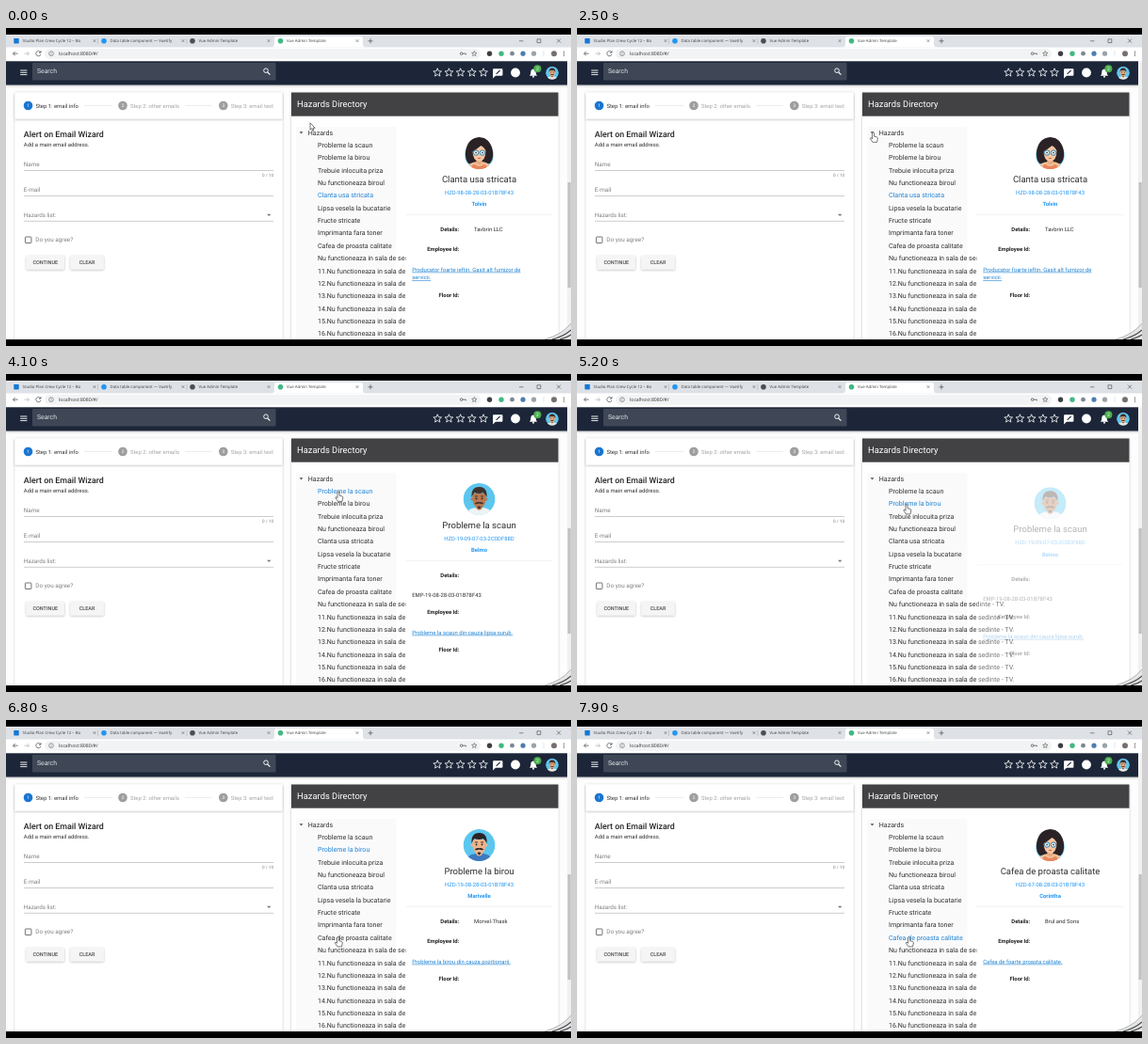
An HTML page that plays this animation: 600x338 px, repeating every 8 s.

```html
<!DOCTYPE html>
<html lang="en">
<head>
<meta charset="utf-8">
<title>Hazards Directory</title>
<style>
  html, body { margin: 0; width: 100%; height: 100%; overflow: hidden; background: #000; }
  #stage { display: block; width: 600px; height: 338px; }
  text { font-family: Roboto, sans-serif; text-rendering: geometricPrecision; white-space: pre; }
  .chrome text { font-family: "Open Sans", sans-serif; }
</style>
</head>
<body>
<svg id="stage" viewBox="0 0 600 338" xmlns="http://www.w3.org/2000/svg"></svg>
<script>
const LOOP = 8000, ROW = 13.36, TREE_H = 16 * ROW, FADE = 300, SLIDE = 6.5;
const BLUE = '#1f82d2', INK = '#303030', GREY = '#808080', NAVY = '#1c2638';

// Markup helpers
const text = (x, y, s, size, fill = INK, more = '') =>
  `<text x="${x}" y="${y}" font-size="${size}" fill="${fill}" ${more}>${s}</text>`;
const rect = (x, y, w, h, fill, more = '') =>
  `<rect x="${x}" y="${y}" width="${w}" height="${h}" fill="${fill}" ${more}/>`;
const dot = (x, y, r, fill, more = '') =>
  `<circle cx="${x}" cy="${y}" r="${r}" fill="${fill}" ${more}/>`;
const line = (d, stroke, w = .7, more = '') =>
  `<path d="${d}" fill="none" stroke="${stroke}" stroke-width="${w}" ${more}/>`;
const shape = (d, fill, more = '') => `<path d="${d}" fill="${fill}" ${more}/>`;
const group = (x, y, scale, body) => `<g transform="translate(${x} ${y}) scale(${scale})">${body}</g>`;
const MID = 'text-anchor="middle"', END = 'text-anchor="end"', BOLD = 'font-weight="700"', MEDIUM = 'font-weight="500"';

function star(x, y, r, color, w) {
  let d = '';
  for (let i = 0; i < 10; i++) {
    const a = Math.PI * (i / 5 - .5), q = i % 2 ? r * .44 : r;
    d += (i ? 'L' : 'M') + (x + q * Math.cos(a)).toFixed(2) + ' ' + (y + q * Math.sin(a)).toFixed(2);
  }
  return line(d + 'Z', color, w);
}

// Cartoon portraits, drawn in a circle of radius 17
const woman = () => `<g clip-path="url(#round)">
  ${dot(0, 2, 15.2, '#5cc0ea')}
  ${shape('M-11 11C-18 5-15-17 0-17S18 5 11 11Z', '#2a2226')}
  ${shape('M-13 18C-12 10-5 9 0 9S12 10 13 18Z', '#f0bd94')}
  ${shape('M-9 18Q-8 12-5 12Q0 16 5 12Q8 12 9 18Z', '#e8845c')}
  ${shape('M-3 5H3V10Q0 14-3 10Z', '#e5a87f')}
  ${shape('M-7-3Q-7 8 0 9Q7 8 7-3Q5-9 0-9T-7-3Z', '#f6c6a0')}
  ${shape('M-8-1Q-8-11 1-11Q9-11 8-1Q6-6 2-8Q-3-4-8-1Z', '#2a2226')}
  <g fill="#dff1f8" stroke="#3a7fa6" stroke-width="1"><circle cx="-3.4" cy="-.4" r="2.7"/><circle cx="3.4" cy="-.4" r="2.7"/></g>
  ${dot(-3.4, -.4, .8, '#222')}${dot(3.4, -.4, .8, '#222')}
  ${shape('M-2 5Q0 6.8 2 5Z', '#c8443f')}</g>`;

const man = (hair, skin, shirt) => `<g clip-path="url(#round)">
  ${dot(0, 0, 17, '#5cc6ee')}
  ${shape('M-14 18C-13 9-5 9 0 9S13 9 14 18Z', shirt)}
  ${shape('M-3 5H3V10Q0 13-3 10Z', skin)}
  ${dot(-7.4, 0, 1.6, skin)}${dot(7.4, 0, 1.6, skin)}
  ${shape('M-7-6Q-8 9 0 10Q8 9 7-6Z', skin)}
  ${shape('M-8-2Q-9-13 0-13T8-2Q6-6 4-7Q0-5-5-7Q-7-5-8-2Z', hair)}
  ${dot(-3, -.6, .9, '#222')}${dot(3, -.6, .9, '#222')}
  ${line('M-4.6-3H-1.6M1.6-3H4.6', hair, .9)}
  ${shape('M-5 5Q-3 2.4 0 3.2Q3 2.4 5 5Q2 5.4 0 4.6Q-2 5.4-5 5Z', hair)}
  ${shape('M-2 8Q0 7 2 8Q1 10.4 0 10.4T-2 8Z', hair)}</g>`;

// Browser window
function tab(x, w, label, icon, square) {
  const mark = square ? rect(x - 2.7, 11, 5.4, 5.4, icon, 'rx=".6"') : dot(x, 13.8, 2.8, icon);
  return mark + `<svg x="${x + 6}" y="8" width="${w - 10}" height="12">${text(.5, 7.2, label, 4.33, '#3c4043')}</svg>` +
    line(`M${x + w - 1.4} 12.2l2.8 2.8m0-2.8l-2.8 2.8`, '#5f6368', .6);
}

const browser = () => '<g class="chrome">' + rect(0, 7, 600, 14, '#dee1e6') +
  shape('M282 20.5Q285 20 285 17V11.5Q285 9 287.5 9H376.5Q379 9 379 11.5V17Q379 20 382 20.5Z', '#fff') +
  tab(11, 83, 'Studio Plan Crew Cycle 12 – Bo', '#1478d4', true) +
  tab(104, 84, 'Data table component — Vuetify', '#2196f3') +
  tab(198, 81, 'Vue Admin Template', '#4a4f55') +
  tab(291.5, 81.5, 'Vue Admin Template', '#41b883') +
  line('M97.5 11v6M192 11v6', '#9aa0a6', .4) +
  line('M384.5 13.8h5M387 11.3v5', '#4a4d51', .7) +
  line('M545 13.8h4.4M564 11.8h3.8v3.8h-3.8zM585 11.6l4 4m0-4l-4 4', '#222', .5) +
  rect(0, 20.5, 600, 14.8, '#fff') + rect(41, 22, 463, 10.8, '#f1f3f4', 'rx="5.4"') +
  '<g transform="translate(0 -.4)">' +
  line('M12.5 27.6h-5m2.2-2.2l-2.2 2.2 2.2 2.2', '#505358', .8) +
  line('M19.5 27.6h5m-2.2-2.2l2.2 2.2-2.2 2.2', '#b5b8bc', .8) +
  line('M36.6 26.2a2.6 2.6 0 1 0 .3 2.2M37 24.6v2h-2', '#505358', .8) +
  dot(48, 27.6, 2.4, 'none', 'stroke="#5f6368" stroke-width=".6"') + line('M48 27.2v1.6M48 26v.5', '#5f6368', .6) +
  text(56, 29.5, 'localhost:8080/#/', 5.15, '#333') +
  dot(483.6, 27.6, 1.3, 'none', 'stroke="#555" stroke-width=".8"') + line('M485 27.6h3.4v1.2', '#555', .8) +
  star(497.3, 27.7, 2.8, '#555', .6) +
  dot(513.5, 27.6, 2.7, '#3c3f44') + dot(526, 27.6, 2.7, '#41b883') + dot(537.5, 27.6, 2.4, '#7c8792') +
  dot(549, 27.6, 2.6, '#4e7db0') + dot(560.5, 27.6, 2.6, '#9aa3a9') +
  line('M571 24.5v6.2', '#c6c9cc', .5) + dot(582, 27.6, 3, '#77706e') +
  [25.6, 27.6, 29.6].map(y => dot(592.5, y, .6, '#555')).join('') + '</g></g>';

// Application bar
const appBar = () => rect(0, 35, 600, 25.5, NAVY, 'filter="url(#soft)"') +
  rect(28, 37, 258.5, 18.5, '#3f4757', 'rx="1"') +
  line('M15.2 45h7.2M15.2 47.3h7.2M15.2 49.6h7.2', '#fff', .9) +
  text(33, 48.4, 'Search', 6.8, '#dfe2e6') +
  dot(276, 45.2, 2.3, 'none', 'stroke="#fff" stroke-width=".9"') + line('M277.7 47l2.7 2.7', '#fff', 1.1) +
  [458.2, 470.4, 482.6, 494.8, 507].map(x => star(x, 47.4, 4.6, '#fff', .8)).join('') +
  shape('M518 43.2h8.4q1 0 1 1v5.6q0 1-1 1h-6.4l-3 2.6v-9.2q0-1 1-1z', '#fff') +
  line('M520.6 48.8l4-3.8', NAVY, 1.1) +
  dot(541, 47.5, 4.9, '#fff') +
  shape('M556 50.7q1.3-1 1.3-3.8 0-2.8 2.7-3.3 2.7.5 2.7 3.3 0 2.8 1.3 3.8z', '#fff') + dot(560, 51.7, 1, '#fff') +
  dot(564.4, 43.2, 4, '#4caf50') + text(564.4, 45, '2', 5, '#fff', MID) +
  group(580, 47.8, .41, man('#4a2d25', '#e3a77e', '#e9e4e0'));

// Form card
const step = (x, n, label, on) => dot(x, 82.5, 4.8, on ? '#1976d2' : '#9e9e9e') +
  text(x, 84.3, n, 4.8, '#fff', MID) + text(x + 7.9, 84.6, label, 5.9, on ? '#333' : '#a4a4a4');
const button = (x, w, label) => rect(x, 242, w, 14.4, '#f5f5f5', 'rx="1" filter="url(#soft)"') +
  text(x + w / 2, 251.1, label, 5.5, '#4a4a4a', MID + ' ' + MEDIUM);

const form = () => rect(9.5, 68.5, 284, 28, '#fff', 'filter="url(#soft)"') +
  step(23.5, 1, 'Step 1: email info', true) + step(124, 2, 'Step 2: other emails') + step(230.8, 3, 'Step 3: email text') +
  line('M83 82.5H113M190 82.5H219', '#dadada', .5) +
  text(18.8, 115.9, 'Alert on Email Wizard', 8.85, '#222', MEDIUM) +
  text(18.8, 125.5, 'Add a main email address.', 5.9) +
  text(18.8, 147.1, 'Name', 6.35, GREY) + text(284, 158.3, '0 / 10', 4.6, GREY, END) +
  text(18.8, 173.8, 'E-mail', 6.35, GREY) + text(18.8, 200.5, 'Hazards list:', 6.25, GREY) +
  line('M19 151.5H284M19 178.5H284M19 205.3H284', '#999', .5) +
  shape('M277 197.8h4.4l-2.2 2.3z', '#777') +
  rect(20.4, 222, 6.5, 6.5, 'none', 'stroke="#666" stroke-width=".9" rx=".6"') +
  text(31.3, 227.4, 'Do you agree?', 6.35, GREY) +
  button(21.5, 40.5, 'CONTINUE') + button(68.3, 35.5, 'CLEAR');

// Hazard tree
const tv = 'Nu functioneaza in sala de sedinte - TV.';
const items = ['Probleme la scaun', 'Probleme la birou', 'Trebuie inlocuita priza', 'Nu functioneaza biroul',
  'Clanta usa stricata', 'Lipsa vesela la bucatarie', 'Fructe stricate', 'Imprimanta fara toner',
  'Cafea de proasta calitate', tv];
for (let n = 11; n <= 16; n++) items.push(n + '.' + tv);

const tree = () => rect(308, 105, 106.5, 13, '#fafafb', 'id="treeBg"') +
  text(320.8, 113.5, 'Hazards', 7.08) +
  '<path id="arrow" d="M-2-1H2L0 1.2Z" fill="#555"/>' +
  '<g clip-path="url(#rows)">' +
  items.map((s, i) => text(331, (126.9 + i * ROW).toFixed(1), s, 7.08, INK, 'class="row"')).join('') + '</g>';

// Detail panels
const panels = [
  { item: 4, face: woman(), id: 'HZD-98-08-28-03-01B78F43', who: 'Tolvin', firm: 'Tavbrin LLC',
    note: ['Producator foarte ieftin. Gasit alt furnizor de', 'servicii.'] },
  { item: 0, face: man('#40312d', '#b97850', '#eef3f5'), id: 'HZD-19-09-07-03-2C0DF88D', who: 'Belmo',
    firm: 'EMP-19-08-28-03-01B78F43', wrap: true, note: ['Probleme la scaun din cauza lipsa surub.'] },
  { item: 1, face: man('#2b2326', '#eeb48a', '#3d79c0'), id: 'HZD-19-08-28-03-01B78F43', who: 'Marivelle',
    firm: 'Morvel-Thask', note: ['Probleme la birou din cauza pozitionarii.'] },
  { item: 8, face: woman(), id: 'HZD-67-08-28-03-01B78F43', who: 'Corintha', firm: 'Brul and Sons',
    note: ['Cafea de foarte proasta calitate.'] },
];

function panel(p) {
  const dy = p.wrap ? 18 : 0, key = (y, s) => text(481.3, y, s, 5.9, '#222', END + ' ' + BOLD);
  return '<g class="panel">' + rect(424.5, 105, 158, 198, '#fff', 'class="sheet"') + group(502.5, 133, 1, p.face) +
    text(502.5, 164.2, items[p.item], 9.5, INK, MID) +
    text(502.5, 176.8, p.id, 5.9, '#2196f3', MID) +
    text(502.5, 189.4, p.who, 5.9, '#2196f3', MID + ' ' + BOLD) +
    line('M424.5 198.3H580', '#e2e2e2', .5) +
    key(215.6, 'Details:') + (p.wrap ? text(431.2, 237.2, p.firm, 5.9) : text(497, 215.6, p.firm, 5.9)) +
    key(237.3 + dy, 'Employee Id:') +
    p.note.map((s, i) => text(431.2, 258.6 + dy + i * 8.7, s, 5.9, BLUE, 'text-decoration="underline"')).join('') +
    key(276.8 + dy + (p.note.length - 1) * 8.7, 'Floor Id:') + '</g>';
}

const footer = () => '<g id="footer">' + rect(0, 0, 596, 60, NAVY) +
  [244.5, 271.2, 297.9, 324.6, 351.3].map(x => rect(x - 4, 11.5, 8, 8, '#fff')).join('') + '</g>';

// Lifted corner of the desktop sheet
const corner = () => shape('M572 331Q590 326 600 314V331Z', '#e4e5e6') +
  line('M572 331Q590 326 600 314', '#8a8d91', .6) +
  line('M580 331Q592 328 600 321M588 331Q595 329.500 600 326', '#4a4a4c', 1.1);

const stage = document.getElementById('stage');
stage.innerHTML = `<defs>
  <filter id="soft" x="-10%" y="-20%" width="120%" height="150%"><feDropShadow dx="0" dy=".8" stdDeviation=".8" flood-opacity=".28"/></filter>
  <clipPath id="round"><circle r="17"/></clipPath>
  <clipPath id="rows"><rect id="rowsBox" x="308" y="118" width="270" height="0"/></clipPath>
  <clipPath id="view"><rect y="7" width="600" height="324"/></clipPath>
  </defs>` + rect(0, 0, 600, 338, '#000') + '<g clip-path="url(#view)">' +
  rect(0, 35, 600, 296, '#fdfdfd') +
  rect(9.5, 68.5, 284, 236, '#fff', 'class="card" filter="url(#soft)"') +
  rect(303, 68.5, 283.5, 236, '#fff', 'class="card" filter="url(#soft)"') +
  form() + rect(303, 68.5, 283.5, 25.2, '#424143') +
  text(309, 84.2, 'Hazards Directory', 9.4, '#fff') +
  tree() + panels.map(panel).join('') + footer() + appBar() +
  rect(596, 35, 4, 296, '#f1f1f1') + rect(596.5, 164, 3.2, 112, '#c1c1c1', 'id="thumb"') +
  corner() + browser() + '</g>' + dot(0, 0, 4.6, '#d4805f', 'id="spot" opacity=".65"') +
  `<g id="pointer" stroke="#222" stroke-width=".6" stroke-linejoin="round" fill="#fff">
   <path d="M0 0V7.4L1.7 5.9L2.9 8.5L4 8L2.9 5.5H5.2Z"/>
   <path d="M-1 .6Q0-.7 1 .6V4.2L4 5Q5 5.4 4.8 6.5L4 10.4H-.5L-3.2 6.5Q-3 5.2-1.7 6L-1 6.8Z"/></g>`;

const all = s => [...stage.querySelectorAll(s)];
const set = (node, name, v) => node.setAttribute(name, v);
const ui = {};
for (const id of ['treeBg', 'arrow', 'rowsBox', 'footer', 'thumb', 'spot', 'pointer']) ui[id] = document.getElementById(id);
const rows = all('.row'), cards = all('.card'), views = all('.panel'), sheets = all('.sheet');
const [arrowCursor, handCursor] = ui.pointer.children;

// Timeline
const path = [[0, 323, 100.8], [150, 323, 100.8], [650, 314, 110.8], [2450, 314, 110.8], [3200, 353, 125],
  [4150, 353, 125], [4650, 350, 138.5], [5950, 350, 138.5], [6650, 352.5, 230.5], [LOOP, 352.5, 230.5]];
const clicks = [850, 2080, 3430, 4980, 6960];
const picks = [[3455, 1], [5005, 2], [6985, 3]];

const clamp = v => Math.max(0, Math.min(1, v));
const ease = v => v * v * (3 - 2 * v);
const ramp = (t, from, to) => ease(clamp((t - from) / (to - from)));
const show = (node, on) => set(node, 'visibility', on ? 'visible' : 'hidden');

function pointerAt(t) {
  const i = path.findIndex((p, n) => n && t <= p[0]);
  const [t0, x0, y0] = path[i - 1], [t1, x1, y1] = path[i], k = ramp(t, t0, t1);
  return [x0 + (x1 - x0) * k, y0 + (y1 - y0) * k];
}

function drawTree(t) {
  const open = 1 - ramp(t, 880, 1160) + ramp(t, 2100, 2420);
  const h = TREE_H * open, bottom = Math.max(304, 132 + h);
  set(ui.rowsBox, 'height', h);
  set(ui.treeBg, 'height', 13 + h);
  set(ui.arrow, 'transform', `translate(313.5 111.2) rotate(${-90 * (1 - open)})`);
  cards.forEach(c => set(c, 'height', bottom - 68.5));
  sheets.forEach(s => set(s, 'height', bottom - 106));
  set(ui.footer, 'transform', `translate(0 ${bottom + 9})`);
  set(ui.thumb, 'y', 174.5 - 10.5 * open);
  set(ui.thumb, 'height', 122 - 10 * open);
}

// The old panel fades while sliding down, then the new one slides in from above
function drawPanels(t) {
  let now = 0, before = 0, since = LOOP;
  for (const [at, n] of picks) if (t >= at) { before = now; now = n; since = t - at; }
  const out = 1 - clamp(since / FADE), into = clamp(since / FADE - 1);
  views.forEach((v, i) => {
    const entering = i === now && into > 0, alpha = entering ? into : i === before ? out : 0;
    set(v, 'opacity', alpha);
    set(v, 'transform', `translate(0 ${(entering ? -SLIDE : SLIDE) * (1 - alpha)})`);
  });
  rows.forEach((r, i) => set(r, 'fill', i === panels[now].item ? BLUE : INK));
}

function drawPointer(t) {
  const [x, y] = pointerAt(t), hand = t > 520;
  set(ui.pointer, 'transform', `translate(${x} ${y})`);
  show(arrowCursor, !hand);
  show(handCursor, hand);
  set(ui.spot, 'cx', x);
  set(ui.spot, 'cy', y + 2.5);
  show(ui.spot, clicks.some(c => t >= c && t < c + 180));
}

const start = performance.now();
function tick() {
  const t = (performance.now() - start) % LOOP;
  drawTree(t);
  drawPanels(t);
  drawPointer(t);
  requestAnimationFrame(tick);
}
tick();
</script>
</body>
</html>
```
